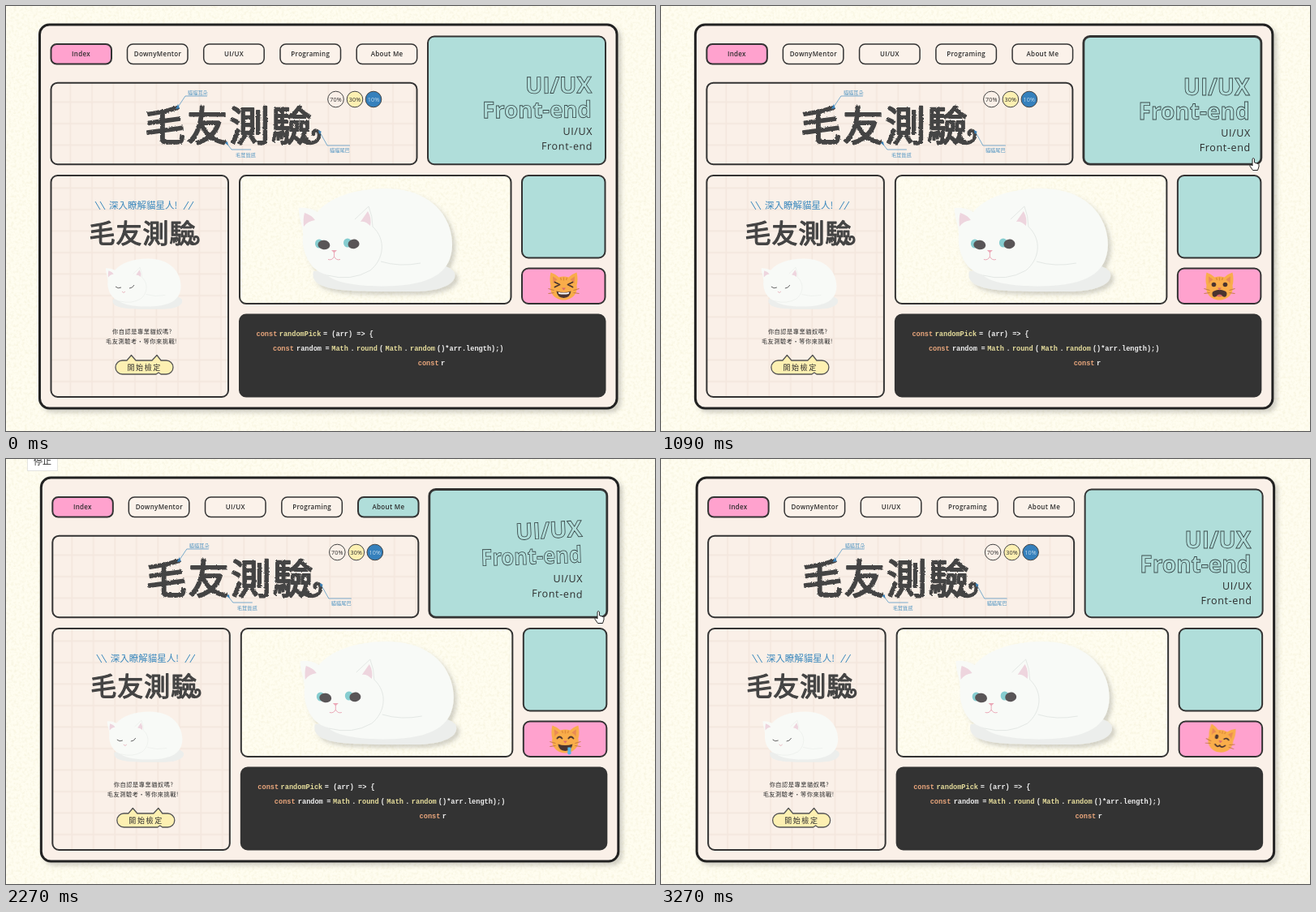
Write an HTML page that moves like this. It is 800x524 px and loops after 3360 ms.

```html
<!DOCTYPE html>
<html lang="zh-Hant">
<head>
<meta charset="utf-8">
<title>Portfolio</title>
<style>
@property --k { syntax: "<number>"; inherits: true; initial-value: 0; }
html, body { margin: 0; width: 100%; height: 100%; overflow: hidden; background: #fffdf0; }
svg { display: block; }
.stage { width: 100vw; height: 100vh; }
text { font-family: "Open Sans", "Noto Sans", sans-serif; fill: #2c2c2c; }
.zh text, text.zh { font-family: "Noto Sans CJK TC", "Noto Sans CJK JP", sans-serif; }
.stage * { animation-duration: 3360ms; animation-iteration-count: infinite; animation-timing-function: linear; }
.stage .hold { animation-timing-function: step-end; }

.drift { animation-name: drift; }
@keyframes drift { to { transform: translateX(2.7px); } }

.box { stroke: #333; stroke-width: 2; }
.nav rect { fill: #fbf2ea; stroke: #333; stroke-width: 1.5; }
.nav text { font-size: 8px; font-weight: 600; letter-spacing: .3px; text-anchor: middle; }
.nav .on { fill: #ffa2ce; stroke-width: 2; }
.nav .about { animation-name: about; }
@keyframes about {
  0%, 39% { fill: #fbf2ea; stroke-width: 1.5; }
  47%, 80.5% { fill: #b0deda; stroke-width: 2; }
  86.6% { fill: #e8ece7; stroke-width: 1.6; }
  90%, 100% { fill: #fbf2ea; stroke-width: 1.5; }
}

.card { animation-name: card; }
@keyframes card { 29.8% { stroke-width: 2.8; } 82% { stroke-width: 2; } }
.tilt { animation-name: tilt; text-anchor: end; }
.tilt text {
  transform-box: fill-box; transform-origin: 100% 50%;
  transform: translate(calc(var(--k) * -16.6px), calc(var(--k) * var(--dy)))
    rotate(calc(var(--k) * var(--r))) scaleX(calc(1 - var(--k) * var(--s, 0)));
}
@keyframes tilt {
  0% { --k: .17; }
  6%, 38% { --k: 0; animation-timing-function: ease-out; }
  49%, 82% { --k: 1; }
  86.6% { --k: .47; animation-timing-function: ease-out; }
  94%, 100% { --k: 0; }
}
.outline { font-size: 28px; font-weight: 700; fill: none; stroke: #3a4a4b; stroke-width: .85; }
.small { font-size: 12.5px; font-weight: 500; letter-spacing: .65px; }

.title { font-weight: 500; fill: #444; stroke: #444; stroke-linejoin: round; }
.tail { fill: none; stroke: #444; stroke-linecap: round; }
.notes { fill: none; stroke: #5b9bc6; stroke-width: .8; }
.notes text { font-size: 6.2px; fill: #4f94c2; stroke: none; }
.pie text { font-size: 7.2px; text-anchor: middle; letter-spacing: .2px; }
.pie circle { stroke: #444; stroke-width: 1; }

.code text { font: bold 8.6px "Liberation Mono", monospace; fill: #eee; white-space: pre; }
.code .c { fill: #e9a67c; }
.code .f { fill: #e6dd9c; }

.faces { animation-name: faces; }
@keyframes faces {
  0%, 42.4%, 74.2% { transform: translateX(0); }
  15.9%, 58.3% { transform: translateX(-120px); }
  10.6%, 31.8% { transform: translateX(-240px); }
  26.5%, 53%, 90.1% { transform: translateX(-360px); }
  5.3%, 63.6%, 68.9% { transform: translateX(-480px); }
  21.2%, 47.7%, 84.8% { transform: translateX(-600px); }
  37.1%, 79.5%, 95.4% { transform: translateX(-720px); }
}
.ink { fill: none; stroke: #4a3430; stroke-width: 1.8; stroke-linecap: round; stroke-linejoin: round; }
.dark { fill: #4a3430; }

.tip { opacity: 0; animation-name: tip; }
@keyframes tip { 44.6% { opacity: 1; } 84.5% { opacity: 0; } }
.cursor { fill: #fff; stroke: #222; stroke-width: 1; stroke-linejoin: round; }
.hand { opacity: 0; animation-name: hand; }
@keyframes hand { 29.8% { opacity: 1; } 79% { opacity: 0; } }
.arrow { opacity: 0; animation-name: arrow; }
@keyframes arrow {
  18.5% { opacity: 1; } 21.6% { opacity: 0; }
  26.8% { opacity: 1; } 29.8% { opacity: 0; }
  79% { opacity: 1; } 85% { opacity: 0; }
}
.path { animation-name: path; }
@keyframes path {
  0%, 21.6% { transform: translate(108px, 0); }
  21.7%, 26.8% { transform: translate(789px, 200px); }
  29.8% { transform: translate(740px, 190px); }
  79% { transform: translate(744px, 190px); }
  82% { transform: translate(760px, 194px); }
  85%, 100% { transform: translate(782px, 196px); }
}
</style>
</head>
<body>
<svg class="stage" viewBox="0 0 800 524">
  <defs>
    <filter id="paper" x="0" y="0" width="1" height="1" color-interpolation-filters="sRGB">
      <feTurbulence type="fractalNoise" baseFrequency=".3" numOctaves="3" seed="4"/>
      <feColorMatrix values="0 0 0 0 .93  0 0 0 0 .91  0 0 0 0 .79  .9 0 0 0 -.38"/>
    </filter>
    <filter id="fur" x="-.1" y="-.2" width="1.2" height="1.4">
      <feTurbulence type="fractalNoise" baseFrequency=".5" numOctaves="2" seed="2"/>
      <feDisplacementMap in="SourceGraphic" scale="2.500" xChannelSelector="R" yChannelSelector="G"/>
    </filter>
    <filter id="lift" x="-.1" y="-.1" width="1.2" height="1.2">
      <feDropShadow dx="4" dy="4" stdDeviation="2.500" flood-color="#555" flood-opacity=".25"/>
    </filter>
    <pattern id="grid" x="40" y="79" width="26.500" height="26.500" patternUnits="userSpaceOnUse">
      <path d="M0 13H26.500M13 0V26.500" stroke="#f4e7de" stroke-width="1.800"/>
    </pattern>
    <clipPath id="pink"><rect x="637" y="324" width="101" height="42" rx="7"/></clipPath>

    <g id="cat">
      <path fill="#eceeec" d="M379 327C374 346 400 352 455 352H505C545 351 558 338 552 327Q540 316 520 320Z"/>
      <path fill="#f8faf7" d="M361 249Q374 248 384 254C398 237 428 225 468 225C520 225 550 256 550 295C549 325 530 342 480 345C440 347 405 342 395 331C377 328 364 305 366 284C367 270 360 260 361 249Z"/>
      <path fill="#f8faf7" stroke="#e4e8e5" d="M430 263L447 247Q452 259 452 272"/>
      <path fill="none" stroke="#e4e8e5" d="M452 272C469 288 466 312 449 326Q425 340 396 332M462 315Q485 322 511 317"/>
      <path fill="#eed5de" d="M368 255Q377 258 381 264Q372 265 367 272Q366 262 368 255ZM446 253Q451 262 449 271Q443 265 437 266Z"/>
    </g>

    <g id="ears">
      <path fill="#f9ad4a" d="M-16-17Q-10-15-6-11Q0-13 6-11Q10-15 16-17Q18-8 16-1C18 10 9 17 0 17S-18 10-16-1Q-18-8-16-17Z"/>
      <path fill="#e98a55" d="M-13.500-12Q-10-10-8-8Q-12-6-13-3ZM13.500-12Q10-10 8-8Q12-6 13-3Z"/>
      <path fill="none" stroke="#dd8a38" stroke-width="1.300" d="M0-11V-7M-4-10.500L-3-7.500M4-10.500L3-7.500"/>
    </g>
    <path id="whiskers" fill="none" stroke="#c67b44" d="M-12 5L-19 3M-12 8L-19 9M12 5L19 3M12 8L19 9"/>
    <path id="nose" fill="#d9686e" d="M-2.500 2H2.500L0 5Z"/>
    <path id="grin" d="M-9 6Q0 9 9 6Q8 14 0 14.500Q-8 14-9 6Z"/>
    <path id="heart" fill="#f4568f" d="M0 4C-8-1-3-6 0-2C3-6 8-1 0 4Z"/>
  </defs>

  <rect width="800" height="524" fill="#fffdf0"/>
  <rect width="800" height="524" filter="url(#paper)"/>

  <g class="drift">
    <rect x="41.500" y="23" width="711.500" height="473" rx="12" fill="#faf0e8" stroke="#222" stroke-width="3" filter="url(#lift)"/>

    <g class="nav">
      <rect class="on" x="55.500" y="47" width="74.500" height="24.500" rx="7"/>
      <rect x="149.500" y="47" width="74.500" height="24.500" rx="7"/>
      <rect x="243.700" y="47" width="74.500" height="24.500" rx="7"/>
      <rect x="338" y="47" width="74.500" height="24.500" rx="7"/>
      <rect class="about" x="432.200" y="47" width="74.500" height="24.500" rx="7"/>
      <text x="92.500" y="62">Index</text>
      <text x="187" y="62">DownyMentor</text>
      <text x="281" y="62">UI/UX</text>
      <text x="375.300" y="62">Programing</text>
      <text x="469.600" y="62">About Me</text>
    </g>

    <!-- banner -->
    <g fill="#faf0e8">
      <rect x="55.500" y="94.700" width="451" height="100.500" rx="8"/>
      <rect class="box" x="55.500" y="94.700" width="451" height="100.500" rx="8" fill="url(#grid)"/>
    </g>
    <g filter="url(#fur)">
      <text class="zh title" x="171" y="166" font-size="50" letter-spacing="2" stroke-width="2">毛友測驗</text>
      <path class="tail" stroke-width="4.500" d="M364 165C374 172 386 169 386 159C386 152 378 152 379 158"/>
    </g>
    <g class="notes zh">
      <path d="M211 126L221 111H248M271 168L278 177H302M386 154L396 172H424"/>
      <path fill="#3b83bb" stroke="none" d="M209 127L212 121L214 126ZM270 169L273 167L274 172ZM385 153L389 155L386 158Z"/>
      <text x="224" y="108.500">貓貓耳朵</text>
      <text x="283" y="186">毛茸質感</text>
      <text x="399" y="179.500">貓貓尾巴</text>
    </g>
    <g class="pie">
      <circle cx="406.500" cy="115" r="9.800" fill="#faf0e8"/>
      <circle cx="430" cy="115" r="9.800" fill="#fdf0b2"/>
      <circle cx="453" cy="115" r="9.800" fill="#3580bc"/>
      <text x="406.500" y="117.600">70%</text>
      <text x="430" y="117.600">30%</text>
      <text x="453" y="117.600" style="fill:#c3dbee">10%</text>
    </g>

    <!-- headline card -->
    <rect class="box card hold" x="520" y="37.500" width="219" height="157.700" rx="8" fill="#b0deda"/>
    <g class="tilt">
      <text class="outline" x="724.800" y="109.500" style="--dy:-14px;--r:-3deg">UI/UX</text>
      <text class="outline" x="724.800" y="139.500" style="--dy:-12px;--r:-2deg;--s:.09">Front-end</text>
      <text class="small" x="726" y="161" style="--dy:-9px;--r:0deg">UI/UX</text>
      <text class="small" x="726" y="178.500" style="--dy:-7px;--r:1.5deg">Front-end</text>
    </g>

    <!-- quiz panel -->
    <g fill="#faf0e8">
      <rect x="55.500" y="209" width="218.500" height="273" rx="8"/>
      <rect class="box" x="55.500" y="209" width="218.500" height="273" rx="8" fill="url(#grid)"/>
    </g>
    <g class="zh">
      <path d="M110 241L116 251M116 241L122 251M225 241L219 251M231 241L225 251" stroke="#3a88bd"/>
      <text x="127" y="250" font-size="11.500" style="fill:#3a88bd">深入瞭解貓星人!</text>
      <text class="title" x="102.500" y="292" font-size="32" letter-spacing="1" stroke-width="1.200">毛友測驗</text>
      <path class="tail" stroke-width="3" d="M228 293C234 295 238 291 237 287C236 283 231 284 232 288"/>
      <g font-size="7.200" letter-spacing=".55" font-weight="500">
        <text x="131" y="403.500">你自認是專業貓奴嗎?</text>
        <text x="123" y="415.500">毛友測驗考・等你來挑戰!</text>
      </g>
      <path d="M149 437L154.500 430.500L160 437H180L186 430.500L191 437H197.500A8.500 8.500 0 0 1 197.500 454H191L188 452L185 454H143.500A8.500 8.500 0 0 1 143.500 437Z" fill="#fdf0b2" stroke="#555" stroke-width="1.300" stroke-linejoin="round"/>
      <text x="149.500" y="449" font-size="9" letter-spacing="1.600">開始檢定</text>
    </g>
    <use href="#cat" transform="translate(-53.900 201.200) scale(.49)"/>
    <path d="M135 346Q138 349 142 347M152 348Q156 348 158 344" fill="none" stroke="#666"/>
    <path d="M143 352Q145 355 147 352" fill="none" stroke="#e5a9b4" stroke-width=".8"/>

    <!-- cat panel -->
    <rect x="288" y="209" width="334.500" height="158" rx="8" fill="#fffdf0"/>
    <rect x="289" y="210" width="332.500" height="156" filter="url(#paper)"/>
    <rect class="box" x="288" y="209" width="334.500" height="158" rx="8" fill="none"/>
    <use href="#cat" filter="url(#lift)"/>
    <g fill="#595557">
      <ellipse cx="386" cy="293" rx="5" ry="5.500" fill="#86cdd0"/>
      <ellipse cx="421" cy="292" rx="5" ry="5.500" fill="#86cdd0"/>
      <ellipse cx="392" cy="294.500" rx="7.500" ry="5.800" transform="rotate(8 392 294)"/>
      <ellipse cx="428.500" cy="293.500" rx="7" ry="5.800" transform="rotate(-8 428 293)"/>
    </g>
    <path fill="#eba9b8" d="M401 301H408L404.500 304.500Z"/>
    <path fill="none" stroke="#eba9b8" d="M404.500 304V309Q402 314 397 312.500M404.500 309Q407 314 412 312.500"/>

    <rect class="box" x="636" y="209" width="102.500" height="101.500" rx="8" fill="#b0deda"/>
    <rect class="box" x="636" y="323.500" width="102.500" height="43.500" rx="8" fill="#ffa2ce"/>

    <!-- mood icons in one strip, 120 apart -->
    <g clip-path="url(#pink)">
      <g class="faces hold">
        <g transform="translate(687.500 345.500)">
          <use href="#ears"/><use href="#whiskers"/><use href="#nose"/>
          <path class="ink" d="M-11-5L-5-2L-11 1M11-5L5-2L11 1"/>
          <use href="#grin" class="dark"/>
          <path fill="#fff" d="M-7 7.200Q0 9 7 7.200L6 9.500Q0 10.500-6 9.500Z"/>
        </g>
        <g transform="translate(807.500 345.500)">
          <g transform="rotate(-6)"><use href="#ears"/><use href="#nose"/></g>
          <path class="ink" d="M-10-1Q-7-5-4-1M4-2Q7-6 10-2"/>
          <path fill="#b9713d" d="M-1 8L12 4Q18 9 12 16Z"/>
          <path stroke="#f7d36a" stroke-width="1.500" d="M3 7L4 11M7 6L8 13M11 5L12 15"/>
          <path fill="#4aa5dd" d="M-18 13Q-12 8-6 11Q-10 17-17 17Z"/>
        </g>
        <g transform="translate(927.500 345.500)">
          <use href="#ears"/><use href="#whiskers"/>
          <circle class="dark" cx="-7" cy="-2" r="2.800"/><circle class="dark" cx="7" cy="-2" r="2.800"/>
          <path class="dark" d="M-9 9C-9 3 9 3 9 9Q9 14 5 13Q0 10-5 13Q-9 14-9 9Z"/>
          <use href="#nose"/>
          <path fill="#d9686e" d="M-4 12Q0 8 4 12Q0 14-4 12Z"/>
        </g>
        <g transform="translate(1047.500 345.500)">
          <use href="#ears"/><use href="#whiskers"/><use href="#nose"/>
          <ellipse class="dark" cx="-7" cy="-1" rx="2.200" ry="3.200"/><ellipse class="dark" cx="7" cy="-1" rx="2.200" ry="3.200"/>
          <use href="#grin" class="dark"/>
          <path fill="#e5646d" d="M-5 12.500Q0 9 5 12.500Q0 15-5 12.500Z"/>
        </g>
        <g transform="translate(1167.500 345.500)">
          <use href="#ears"/><use href="#whiskers"/><use href="#nose"/>
          <path class="ink" d="M-10-1Q-7-5-4-1M4-1Q7-5 10-1"/>
          <use href="#grin" class="dark"/>
          <path fill="#55b5e8" d="M3 10H7V15Q8 19 5 19T3 15Z"/>
        </g>
        <g transform="translate(1287.500 345.500)">
          <use href="#ears" transform="translate(0 3) scale(.95)"/>
          <g transform="translate(0 3)"><use href="#whiskers"/><use href="#nose"/></g>
          <path class="ink" d="M-10 3Q-7-1-4 3M4 3Q7-1 10 3M-5 9Q-2 12 0 9Q2 12 5 9"/>
          <use href="#heart" x="-10" y="-11"/><use href="#heart" x="1" y="-14"/>
          <use href="#heart" x="11" y="-10"/><use href="#heart" x="-3" y="-7"/>
        </g>
        <g transform="translate(1407.500 345.500) rotate(12) scale(.95)">
          <use href="#ears"/><use href="#whiskers"/><use href="#nose"/>
          <ellipse class="dark" cx="-6" cy="-2" rx="2.200" ry="3"/>
          <path class="ink" d="M4-1Q7-4 10-1M-6 8Q-2 12 0 8Q3 12 7 7"/>
        </g>
      </g>
    </g>

    <!-- code panel -->
    <rect class="box" x="288" y="380.500" width="450.500" height="101" rx="8" fill="#333"/>
    <g class="code">
      <text class="c" x="308.500" y="407">const</text>
      <text class="f" x="336.800" y="407">randomPick</text>
      <text x="391" y="407">= (arr) =&gt; {</text>
      <text class="c" x="329" y="425">const</text>
      <text x="358" y="425">random</text>
      <text x="393.500" y="425">=</text>
      <text class="f" x="401.300" y="425">Math</text>
      <text x="424.500" y="425">.</text>
      <text class="f" x="432" y="425">round</text>
      <text x="460" y="425">(</text>
      <text class="f" x="467.500" y="425">Math</text>
      <text x="490.500" y="425">.</text>
      <text class="f" x="498" y="425">random</text>
      <text x="531" y="425">()*arr.length);)</text>
      <text class="c" x="507.800" y="443">const</text>
      <text x="536" y="443">r</text>
    </g>
  </g>

  <g class="tip hold">
    <rect x="26.500" y="-10" width="37" height="24.500" fill="#fff" stroke="#e4e4e0"/>
    <text class="zh" x="34" y="7" font-size="11">停止</text>
  </g>
  <g class="path">
    <path class="cursor arrow hold" d="M0 .500V14.500L3.200 11.500L5.500 16.800L7.800 15.800L5.500 10.700H10Z"/>
  </g>
  <path class="cursor hand hold" d="M729 188.500Q730 186.500 731.500 188.500V193L736 194.500Q737.500 195 737 198L735.500 202.500H729.500L726 197.500Q725.500 195.500 727.500 196L729 197Z"/>
</svg>
</body>
</html>
```
